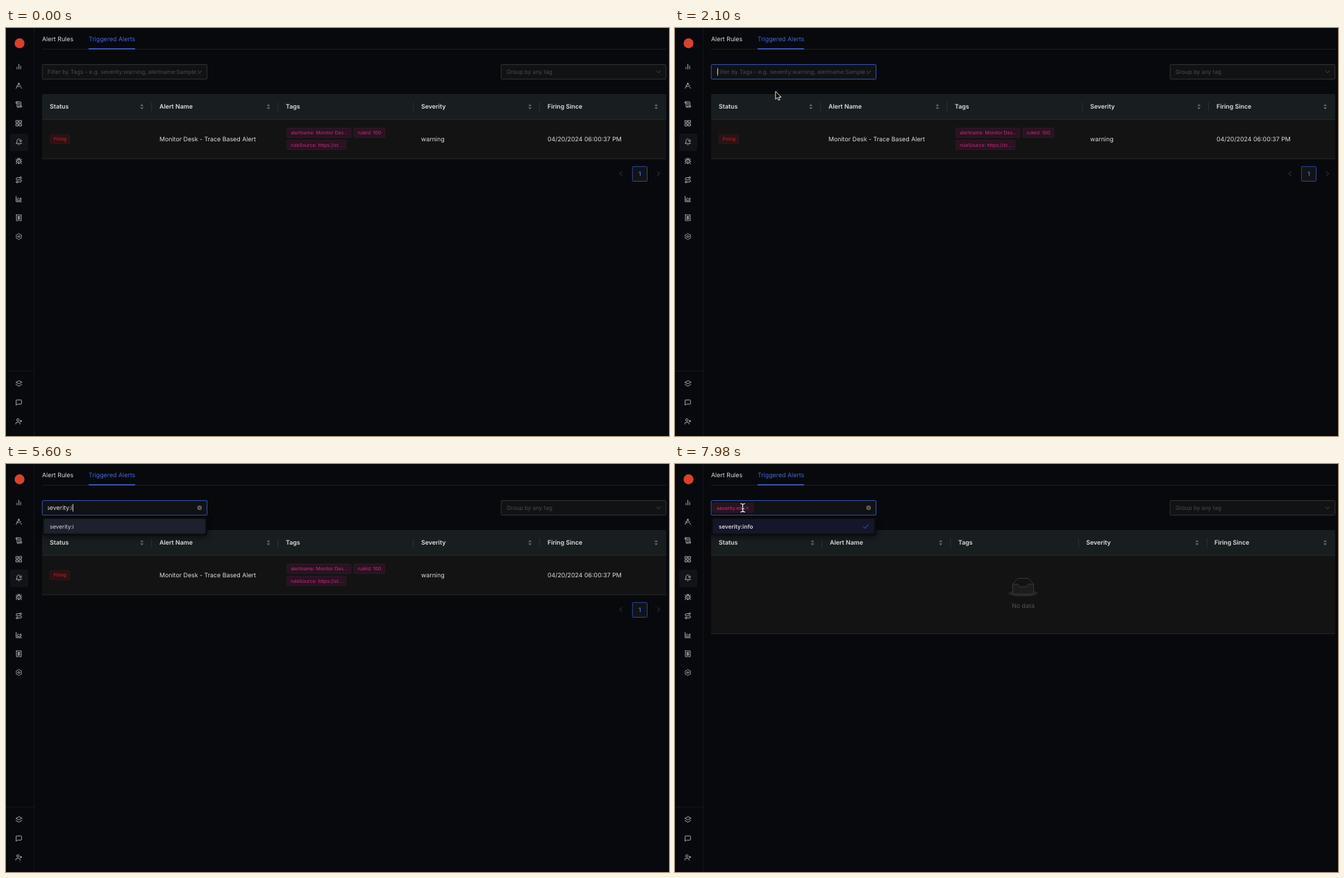
These frames come from a looping animation (955 by 587 pixels, 8 s). An HTML page:

```html
<!DOCTYPE html>
<html lang="en">
<head>
<meta charset="utf-8">
<title>Triggered alerts</title>
<style>
  html, body { margin: 0; width: 100%; height: 100%; overflow: hidden; background: #08090c; }
  svg { display: block; width: 955px; height: 587px; }
  text { font-family: Inter, "Open Sans", sans-serif; text-rendering: geometricPrecision; white-space: pre; }
</style>
</head>
<body>
<svg id="stage" viewBox="0 0 955 587" xmlns="http://www.w3.org/2000/svg">
  <clipPath id="hintClip"><rect x="54" y="54" width="226" height="18"/></clipPath>
  <clipPath id="typedClip"><rect x="60" y="54" width="212" height="18"/></clipPath>
</svg>
<script>
const LOOP = 8000, STEP = 70;
const BASE = 8.84, FIELD = 8.13, SMALL = 6.88;
const BLUE = '#4566d6', PINK = '#cb2b83';
const stage = document.getElementById('stage');

function add(parent, tag, attrs) {
  const el = document.createElementNS('http://www.w3.org/2000/svg', tag);
  for (const key in attrs) el.setAttribute(key, attrs[key]);
  return parent.appendChild(el);
}
const group = (parent = stage, attrs = {}) => add(parent, 'g', attrs);
const rect = (parent, x, y, width, height, fill, more = {}) =>
  add(parent, 'rect', { x, y, width, height, fill, ...more });
const line = (parent, d, stroke, width = 0.8) =>
  add(parent, 'path', { d, stroke, fill: 'none', 'stroke-width': width, 'stroke-linecap': 'round', 'stroke-linejoin': 'round' });

// Text centred vertically on mid
function label(parent, str, x, mid, size = BASE, fill = '#dcdcdc', more = {}) {
  const el = add(parent, 'text', { x, y: mid + size * 0.36, 'font-size': size, fill, ...more });
  el.textContent = str;
  return el;
}
const show = (el, on) => el.setAttribute('visibility', on ? 'inherit' : 'hidden');

// Sidebar
const circle = (x, y, r) => `M${x - r} ${y}a${r} ${r} 0 1 0 ${2 * r} 0a${r} ${r} 0 1 0 ${-2 * r} 0`;
const box = (x, y, s) => `M${x} ${y}h${s}v${s}h${-s}z`;
function gear() {
  let d = '';
  for (let i = 0; i < 72; i++) {
    const a = i * Math.PI / 36, r = 9 + 1.2 * Math.cos(6 * a + Math.PI);
    d += `${i ? 'L' : 'M'}${(12 + r * Math.cos(a)).toFixed(2)} ${(12 + r * Math.sin(a)).toFixed(2)}`;
  }
  return d + 'z' + circle(12, 12, 3);
}
const icons = [
  [55.5, 'M18 20V10M12 20V4M6 20v-6'],
  [83, circle(12, 5, 2) + 'M3 21L11 6.7M13 6.7l2 3.5M19 12c-3.9 4-10.1 4-14 0M21 21l-2.2-3.8'],
  [110, 'M15 12h-5M15 8h-5M19 17V5a2 2 0 0 0-2-2H4M8 21h12a2 2 0 0 0 2-2v-1a1 1 0 0 0-1-1H11a1 1 0 0 0-1 1v1a2 2 0 1 1-4 0V5a2 2 0 1 0-4 0v2a1 1 0 0 0 1 1h3'],
  [137, box(3, 3, 7) + box(14, 3, 7) + box(14, 14, 7) + box(3, 14, 7)],
  [164, 'M19.4 14.9C20.2 16.4 21 17 21 17H3s3-2 3-9c0-3.3 2.7-6 6-6 .7 0 1.3.1 1.9.3M10.3 21a2 2 0 0 0 3.4 0' + circle(18, 8, 3)],
  [191.5, 'M8 2l1.9 1.9M14.1 3.9L16 2M9 7v-1a3 3 0 1 1 6 0v1M12 20c-3.3 0-6-2.7-6-6v-3a4 4 0 0 1 4-4h4a4 4 0 0 1 4 4v3c0 3.3-2.7 6-6 6M12 20v-9M6.5 9C4.6 8.8 3 7.1 3 5M6 13H2M3 21c0-2.1 1.7-3.9 3.8-4M21 5c0 2.1-1.6 3.8-3.5 4M22 13h-4M17.2 17c2.1.1 3.8 1.9 3.8 4'],
  [218.5, circle(6, 19, 3) + 'M9 19h8.5a3.5 3.5 0 0 0 0-7h-11a3.5 3.5 0 0 1 0-7H15' + circle(18, 5, 3)],
  [246, 'M3 3v18h18M7 12v5h12V8l-5 5-4-4z'],
  [273, 'M4 2v20l2-1 2 1 2-1 2 1 2-1 2 1 2-1 2 1V2l-2 1-2-1-2 1-2-1-2 1-2-1-2 1zM16 8h-6a2 2 0 1 0 0 4h4a2 2 0 1 1 0 4H8M12 17.5v-11'],
  [300, gear()],
  [511.5, 'M12 3L2 8l10 5 10-5zM2 15l10 6 10-6'],
  [539, 'M21 15a2 2 0 0 1-2 2H7l-4 4V5a2 2 0 0 1 2-2h14a2 2 0 0 1 2 2z'],
  [566, 'M16 21v-2a4 4 0 0 0-4-4H6a4 4 0 0 0-4 4v2' + circle(9, 7, 4) + 'M19 8v6M22 11h-6']
];
rect(stage, 0, 0, 955, 587, '#08090c');
rect(stage, 40, 0, 1, 587, '#15171e');
rect(stage, 0, 493, 40, 1, '#15171e');
rect(stage, 6, 152, 26, 25, '#121318', { rx: 2 });
add(stage, 'circle', { cx: 19.5, cy: 22, r: 7.2, fill: '#d9412c' });
for (const [y, d] of icons)
  line(group(stage, { transform: `translate(13.3 ${y - 5.2}) scale(.433)` }), d, '#bfc0c3', 2);

// Tabs
rect(stage, 52, 30, 899, 0.8, '#212327');
rect(stage, 119, 29.2, 67, 1.5, BLUE);
label(stage, 'Alert Rules', 52, 15.5);
label(stage, 'Triggered Alerts', 119, 15.5, BASE, BLUE);

// Table
function header(parent, names, seps, sorts) {
  rect(parent, 52, 95, 899, 37, '#181d1f', { rx: 2 });
  rect(parent, 52, 131, 899, 0.8, '#282c2e');
  names.forEach(([str, x]) => label(parent, str, x, 113.2, BASE, '#dddfdf', { 'font-weight': 600 }));
  seps.forEach(x => rect(parent, x - 0.4, 107, 0.8, 12.5, '#34383a'));
  sorts.forEach(x => add(parent, 'path', {
    d: `M${x - 2.5} 112.3h5l-2.5-2.8zM${x - 2.5} 114.2h5l-2.5 2.8z`, fill: '#666b6d'
  }));
}
function chip(parent, str, x, mid, width, [fill, edge, ink], weight = 400) {
  rect(parent, x, mid - 6.7, width, 13.4, fill, { rx: 1.3, stroke: edge, 'stroke-width': 0.6 });
  return label(parent, str, x + 5.5, mid, SMALL, ink, { 'font-weight': weight });
}
const magenta = ['#291321', '#471a34', PINK], red = ['#2a1215', '#421619', '#d32029'];

const full = group();
header(full, [['Status', 63], ['Alert Name', 221], ['Tags', 403], ['Severity', 598], ['Firing Since', 780]],
  [209.7, 391.7, 586.7, 768.7], [195.7, 378, 754.7, 936.5]);
rect(full, 52, 132, 899, 56, '#131314');
rect(full, 52, 187.6, 899, 0.9, '#2d2d2e');
chip(full, 'Firing', 63.2, 160, 28.3, red);
label(full, 'Monitor Desk - Trace Based Alert', 221, 159.6);
chip(full, 'alertname: Monitor Des...', 404.7, 150.8, 92.3, magenta);
chip(full, 'ruleId: 100', 501, 150.8, 44.6, magenta);
chip(full, 'ruleSource: https://st...', 404.7, 168.1, 85, magenta);
label(full, 'warning', 598, 159.6);
label(full, '04/20/2024 06:00:37 PM', 780, 159.6);
line(full, 'M887.3 206.6l-3.4 2.9 3.4 2.9', '#4a4a4b');
line(full, 'M938.3 206.6l3.4 2.9-3.4 2.9', '#4a4a4b');
rect(full, 902.3, 199.3, 21.2, 21.2, '#121316', { rx: 1.2, stroke: '#3552c2', 'stroke-width': 0.8 });
label(full, '1', 912.9, 210, BASE, BLUE, { 'text-anchor': 'middle', 'font-weight': 600 });

const empty = group();
header(empty, [['Status', 63], ['Alert Name', 223], ['Tags', 408], ['Severity', 592.3], ['Firing Since', 777]],
  [211.8, 396.8, 581.3, 766.3], [198, 382.7, 752, 936.5]);
rect(empty, 52, 132, 899, 112, '#131314');
rect(empty, 52, 243.6, 899, 0.9, '#2d2d2e');
const tray = group(empty, { transform: 'translate(480.6 163.8) scale(.652)' });
add(tray, 'ellipse', { cx: 32, cy: 34, rx: 32, ry: 7, fill: '#272728' });
const trayLook = { stroke: '#424243', 'stroke-width': 1.2 };
add(tray, 'path', { d: 'M55 13.8L44.9 2.3Q44 1 42.9 1H21.1Q20 1 19.1 2.3L9 13.8V23H55z', fill: '#131314', ...trayLook });
add(tray, 'path', { d: 'M41.6 17c0-1.7 1-3 2.2-3H55v18.1c0 2.2-1.3 3.9-3 3.9H12c-1.7 0-3-1.7-3-3.9V14h11.2c1.2 0 2.2 1.3 2.2 3s1 2.9 2.2 2.9h14.8c1.2 0 2.2-1.3 2.2-2.9z', fill: '#1d1d1e', ...trayLook });
label(empty, 'No data', 501.5, 203.6, BASE, '#535354', { 'text-anchor': 'middle' });

// Selects
const chevron = x => line(stage, `M${x - 2.6} 61.6l2.6 3.1 2.6-3.1`, '#58585a', 0.75);
const field = x => rect(stage, x, 52.6, 237.4, 21, '#111214', { rx: 1.3, stroke: '#3d3d3e', 'stroke-width': 0.8 });
field(713.2);
label(stage, 'Group by any tag', 721, 63.2, FIELD, '#4b4b4d');
chevron(940);

const filter = field(52.2);
const hint = label(stage, 'Filter by Tags - e.g. severity:warning, alertname:Sample...', 59.8, 63.2, FIELD, '#4b4b4d', { 'clip-path': 'url(#hintClip)' });
const arrow = chevron(279);
const clear = group();
add(clear, 'circle', { cx: 278.8, cy: 63, r: 3.3, fill: '#636365' });
line(clear, 'M277.6 61.8l2.4 2.4M280 61.8l-2.4 2.4', '#111214', 0.7);
const typed = label(group(stage, { 'clip-path': 'url(#typedClip)' }), '', 60, 63, BASE, '#dcdcdc', { 'text-anchor': 'end' });
const caret = rect(stage, 0, 57.5, 0.8, 11, '#e6e6e6');
const picked = group();
chip(picked, 'severity:info', 54.5, 63.2, 58.3, magenta, 500);
line(picked, 'M102.5 61.7l3.2 3.2M105.7 61.7l-3.2 3.2', '#96567a', 0.7);

// Popup list
const popup = group();
const panel = rect(popup, 52.2, 76.7, 237.4, 26.3, '#0b0c0f', { rx: 2 });
panel.style.filter = 'drop-shadow(0 2px 4px rgba(0,0,0,.55))';
const option = rect(popup, 54.5, 79, 232.7, 21.3, '#1d212d', { rx: 1.5 });
const optionText = label(popup, '', 63, 89.7, FIELD, '#d6d7da');
const check = line(popup, 'M271.5 90l2.4 2.6 4.4-5.4', BLUE, 0.9);

// Pointers
const pointer = group();
add(pointer, 'path', { d: 'M0 0V11.2l2.6-2.4 1.7 3.9 2-.9-1.7-3.7h3.6z', fill: '#050505', stroke: '#fff', 'stroke-width': 0.9 });
const beam = group();
const beamPath = 'M-3 -6Q0 -6 0 -4Q0 -6 3 -6M0 -4V4M-3 6Q0 6 0 4Q0 6 3 6M-1.5 1.5h3';
line(beam, beamPath, '#111', 2.4);
line(beam, beamPath, '#fff', 1.1);

// Timeline
const FOCUS = 1960, TYPE = 2450, ENTER = 6720;
const word = 'severity:info';
const keyTimes = [TYPE, 2800, 3080, 3150, 3360, 3570, 3780, 3920, 4830, 5600, 5740, 5950, 6090];
const caretOn = [[FOCUS, 4480], [4830, 5320], [5600, 6580], [6790, 7140]];
const moves = [
  { from: 70, to: 420, a: [433, 515], b: [160, 217], until: 630 },
  { from: 630, to: 1540, a: [160, 217], b: [139.7, 64.6], until: FOCUS },
  { from: FOCUS, to: 2240, a: [139.7, 64.6], b: [150, 118], until: 2240 },
  { from: 7420, to: 7980, a: [43.5, 77.5], b: [97.6, 63], until: LOOP }
];
const clamp = v => Math.min(1, Math.max(0, v));
const ease = v => v * v * (3 - 2 * v);
const within = (t, [a, b]) => t >= a && t < b;

function drawPointer(t) {
  const m = moves.find(m => within(t, [m.from, m.until]));
  show(pointer, false);
  show(beam, false);
  if (!m) return;
  const k = ease(clamp((t - m.from) / (m.to - m.from)));
  const [x, y] = m.a.map((v, i) => v + (m.b[i] - v) * k);
  const shape = t >= ENTER && x > 54 ? beam : pointer;
  shape.setAttribute('transform', `translate(${x} ${y})`);
  show(shape, true);
}

function draw(t) {
  const done = t >= ENTER, typing = t >= TYPE && !done;
  const str = word.slice(0, keyTimes.filter(k => t >= k).length);
  show(full, !done);
  show(empty, done);
  show(picked, done);
  show(hint, t < TYPE);
  show(arrow, t < TYPE);
  show(clear, t >= TYPE);
  filter.setAttribute('stroke', t >= FOCUS ? BLUE : '#3d3d3e');

  optionText.textContent = str;
  optionText.setAttribute('font-weight', done ? 600 : 400);
  option.setAttribute('fill', t >= 6930 ? '#15162a' : '#1d212d');
  show(check, done);
  const open = clamp((t - TYPE + 10) / 200);
  show(popup, t >= TYPE);
  popup.setAttribute('opacity', open < 1 ? Math.pow(open, 1.7) : 1);
  const scale = 0.8 + 0.2 * ease(open);
  popup.setAttribute('transform', `translate(0 ${76.7 * (1 - scale)}) scale(1 ${scale})`);

  // The field is slightly narrower than its text, so the text end follows the caret
  const end = done ? 114 : 61.2 + (str ? optionText.getComputedTextLength() : 0);
  typed.textContent = typing ? str : '';
  typed.setAttribute('x', end);
  caret.setAttribute('x', end);
  show(caret, caretOn.some(span => within(t, span)));
  drawPointer(t);
}

const start = performance.now();
function tick() {
  const t = (performance.now() - start) % LOOP;
  draw(Math.floor(t / STEP) * STEP);
  requestAnimationFrame(tick);
}
tick();
</script>
</body>
</html>
```
